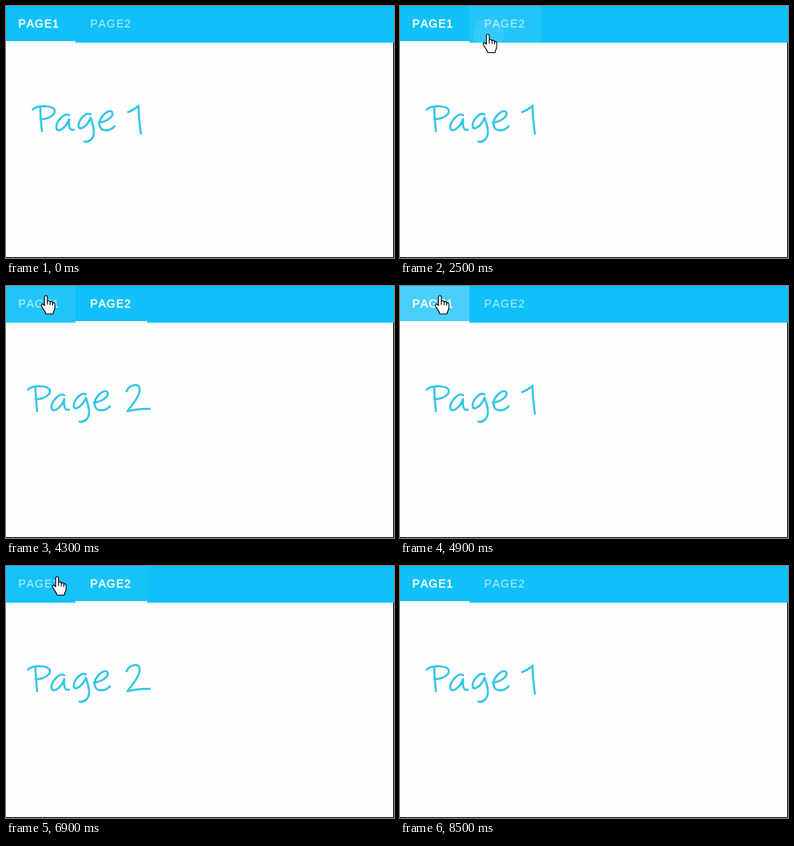
These frames come from a looping animation (486 px wide and 316 px high, 9500 ms). An HTML page:

```html
<!DOCTYPE html>
<html lang="en">
<head>
<meta charset="utf-8">
<title>Tabs</title>
<style>
  html, body { margin: 0; width: 100%; height: 100%; overflow: hidden; background: #fefefe; }
  svg { display: block; }
  text { font: 14px "Liberation Sans", Arial, sans-serif; letter-spacing: 0.95px; font-kerning: none; fill: #fff; stroke: #fff; }
  .ink { fill: none; stroke: #34c6e4; stroke-width: 2.6; stroke-linecap: round; stroke-linejoin: round; }
  .pointer { fill: #fff; stroke: #000; stroke-width: 1.1; stroke-linejoin: round; }
</style>
</head>
<body>
<svg width="486" height="316" viewBox="0 0 486 316">
  <defs>
    <clipPath id="clip0"><rect width="87" height="46"/></clipPath>
    <clipPath id="clip1"><rect x="87" width="90" height="46"/></clipPath>
    <path id="word" d="M33.5 130C37 126 46 125 52 126C62 127 64 133 57 138C53 141 48 142 43 142
      M43 128C43 137 44 148 45 157
      M79 137C74 133 63 144 63 152C63 160 74 155 79 142C78 149 79 157 85 155
      M106 136C100 132 90 144 91 151C92 157 102 151 106 140C109 149 113 161 107 167C104 170 101 171 98 170
      M116 146C124 146 136 139 133 133C129 128 117 139 117 148C118 159 130 157 136 151"/>
  </defs>
  <path d="M485.5 0V315.5H0" fill="none" stroke="#000"/>
  <rect width="486" height="46" fill="#10c0f8"/>
  <rect class="glow" width="87" height="46" fill="#fff"/>
  <rect class="glow" x="87" width="90" height="46" fill="#fff"/>
  <g clip-path="url(#clip0)"><circle class="ripple" fill="#fff"/></g>
  <g clip-path="url(#clip1)"><circle class="ripple" fill="#fff"/></g>
  <text class="label" x="15.5" y="27">PAGE1</text>
  <text class="label" x="105.5" y="27">PAGE2</text>
  <rect id="bar" y="44" height="2" fill="#fff"/>
  <g class="page ink"><use href="#word"/><path d="M153 133C158 131 163 128 166 125C166 136 167 148 169 160"/></g>
  <g class="page ink"><use href="#word" x="-6"/><path d="M151 132C154 125 164 121 167 127C170 135 159 148 152 157C160 155 171 154 180 154"/></g>
  <g id="cursor" class="pointer">
    <path id="hand" d="M-1.8 13V2C-1.8 -.1 1.8 -.1 1.8 2V8C2.4 6.4 5 6.7 5.2 8.6C6 7.3 8.2 7.8 8.4 9.8C9.4 8.8 11.2 9.6 11.2 11.4V16C11.2 18.5 9.4 19.5 9 23.5H0C-.4 20.6 -3.4 18 -5.6 13.6C-6.8 11 -4 10 -1.8 13ZM1.8 8V12M5.2 8.6V12.4M8.4 9.8V13"/>
    <path id="arrow" d="M0 0V16L3.8 12.5L6.4 18.5L9 17.4L6.4 11.5H11.5Z"/>
  </g>
</svg>
<script>
const LOOP = 9500, STEP = 100, PRESS = 280;
const $ = id => document.getElementById(id);
const all = name => [...document.querySelectorAll('.' + name)];
const glows = all('glow'), ripples = all('ripple'), labels = all('label'), pages = all('page');
const tabs = [{ x: 0, w: 87 }, { x: 87, w: 90 }];

// time at which the tab becomes selected, and where it was pressed
const clicks = [
  { at: 2700, tab: 1, x: 111, y: 35 },
  { at: 4600, tab: 0, x: 50, y: 12 },
  { at: 5900, tab: 1, x: 127, y: 13 },
  { at: 7600, tab: 0, x: 52, y: 16 }
];
// tab, fade-in start and end, fade-out start and end
const hovers = [
  [0, 1300, 1600, 1700, 2100], [1, 2400, 2460, 3700, 4100], [0, 3800, 4300, 5000, 5500],
  [1, 5100, 5600, 6500, 7100], [0, 6700, 7250, 7750, 8300]
];
// time, x, y
const route = [
  [600, 14, 322], [1600, 50, 23], [2000, 134, 24], [2200, 110, 35], [3600, 110, 35],
  [4200, 50, 11.5], [5000, 50, 11.5], [5500, 127, 12], [6300, 127, 12], [6900, 64, 13],
  [7200, 52, 15], [7700, 52, 15], [8500, 14, 322]
];

const ramp = (t, a, b) => Math.min(1, Math.max(0, (t - a) / (b - a)));
const ease = k => k * k * (3 - 2 * k);
const mix = (a, b, k) => a + (b - a) * k;
const set = (el, attrs) => { for (const k in attrs) el.setAttribute(k, attrs[k]); };

function drawTabs(t) {
  const last = clicks.filter(c => c.at <= t).pop() || { at: -LOOP, tab: 0 };
  const to = tabs[last.tab], from = last.at < 0 ? to : tabs[1 - last.tab];
  const k = ease(ramp(t, last.at, last.at + 300));
  set($('bar'), { x: mix(from.x, to.x, k), width: mix(from.w, to.w, k) });

  tabs.forEach((_, i) => {
    const active = i === last.tab;
    set(labels[i], { opacity: active ? 1 : 0.62, 'stroke-width': active ? 0.45 : 0.2 });
    set(pages[i], { visibility: active && t >= last.at + STEP ? 'visible' : 'hidden' });

    const glow = hovers.filter(h => h[0] === i)
      .reduce((sum, [, a, b, c, d]) => sum + ramp(t, a, b) * (1 - ramp(t, c, d)), 0);
    set(glows[i], { opacity: 0.08 * glow });

    const hit = clicks.find(c => c.tab === i && t > c.at - PRESS && t < c.at + 700);
    if (!hit) return set(ripples[i], { r: 0 });
    const age = t - hit.at + PRESS;
    const alpha = 0.3 * ramp(age, 0, PRESS) * (1 - ramp(t, hit.at, hit.at + 700));
    set(ripples[i], { cx: hit.x, cy: hit.y, r: age * 0.24, opacity: alpha });
  });
}

function drawCursor(t) {
  const n = route.findIndex(p => p[0] > t);
  const shown = n > 0;
  set($('cursor'), { display: shown ? 'inline' : 'none' });
  if (!shown) return;
  const [a, b] = [route[n - 1], route[n]];
  const k = ease(ramp(t, a[0], b[0]));
  const y = mix(a[2], b[2], k);
  set($('cursor'), { transform: `translate(${mix(a[1], b[1], k)} ${y})` });
  set($('hand'), { display: y < 46 ? 'inline' : 'none' });
  set($('arrow'), { display: y < 46 ? 'none' : 'inline' });
}

const start = performance.now();
function frame() {
  const now = Math.max(0, performance.now() - start) % LOOP;
  const t = Math.floor(now / STEP) * STEP;
  drawTabs(t);
  drawCursor(t);
  requestAnimationFrame(frame);
}
frame();
</script>
</body>
</html>
```
